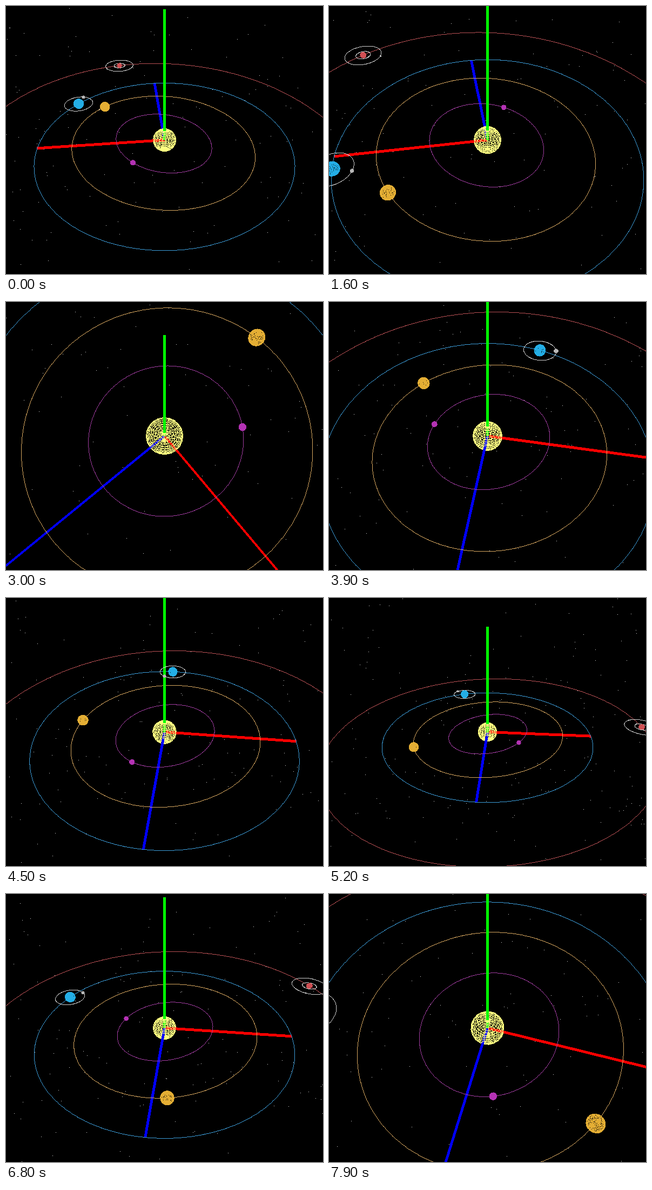
These frames come from a looping animation (587 by 495 pixels, 8000 ms). An HTML page with a canvas:

```html
<!DOCTYPE html>
<html>
<head>
<meta charset="utf-8">
<style>
html, body { margin: 0; width: 100%; height: 100%; overflow: hidden; background: #000; }
canvas { display: block; }
</style>
</head>
<body>
<canvas id="stage" width="587" height="495"></canvas>
<script>
const W = 587, H = 495, FOCAL = 567, LOOP = 8000, STEP = 100, RAD = Math.PI / 180;
const SUN_R = 0.092;
const ctx = document.getElementById('stage').getContext('2d');

// Distances in units of the blue planet's orbit, angles in degrees, rates in degrees per second.
const planets = [
  { r: 0.387, tilt: 7, start: -47.4, rate: 121.8, size: 0.0174, color: '#b432b4', ring: '#a03ca0', moons: [] },
  { r: 0.723, tilt: 3.39, start: 46.4, rate: 47.6, size: 0.0428, color: '#e4ae34', ring: '#d8a860', moons: [] },
  { r: 1, tilt: 0, start: 40.9, rate: 29.2, size: 0.0455, color: '#24aee6', ring: '#3c9cd8',
    moons: [{ r: 0.132, start: 105, rate: 392.4, size: 0.0123 }] },
  { r: 1.52, tilt: 1.85, start: 75.7, rate: 15.5, size: 0.025, color: '#d05054', ring: '#b85054',
    moons: [{ r: 0.0635, start: -32, rate: 1190, size: 0.004 },
            { r: 0.159, start: -29.6, rate: 984, size: 0.005 }] }
];

// Slightly uneven simulation clock, and the camera's run back and forth along z.
const clock = [[0, 0], [1.6, 1.602], [3, 3.026], [3.9, 3.95], [5.2, 5.214], [6.8, 6.804], [8, 8]];
const dolly = [[0, -1.959], [0.56, -2.583], [5.705, 3.17], [8, 0.648]];

function along(keys, t) {
  let i = 1;
  while (i < keys.length - 1 && t > keys[i][0]) i++;
  const [t0, a] = keys[i - 1], [t1, b] = keys[i];
  return a + (b - a) * (t - t0) / (t1 - t0);
}

let seed = 7;
function random() {
  seed = (seed * 16807) % 2147483647;
  return seed / 2147483647;
}
const stars = Array.from({ length: 600 }, () => [0, 0, 0].map(() => random() * 6 - 3));

let cam, dist, sinE, cosE, sinA, cosA;
function aim(z) {
  cam = [0.21, 1.503, z];
  dist = Math.hypot(...cam);
  const flat = Math.hypot(cam[0], z);
  sinE = cam[1] / dist;
  cosE = flat / dist;
  sinA = cam[0] / flat;
  cosA = z / flat;
}

function project([x, y, z]) {
  const u = x * cosA - z * sinA, w = x * sinA + z * cosA;
  const depth = dist - cosE * w - sinE * y;
  if (depth < 0.05) return null;
  return [W / 2 + FOCAL * u / depth, H / 2 - FOCAL * (cosE * y - sinE * w) / depth];
}

// Hard-edged line, widened across its minor direction.
function line(p, q, width = 1) {
  const a = project(p), b = project(q);
  if (!a || !b) return;
  const dx = b[0] - a[0], dy = b[1] - a[1];
  const n = Math.max(1, Math.ceil(Math.max(Math.abs(dx), Math.abs(dy))));
  const steep = Math.abs(dy) > Math.abs(dx), half = width >> 1;
  for (let i = 0; i <= n; i++) {
    const x = Math.floor(a[0] + dx * i / n), y = Math.floor(a[1] + dy * i / n);
    if (x < -width || y < -width || x > W + width || y > H + width) continue;
    if (steep) ctx.fillRect(x - half, y, width, 1);
    else ctx.fillRect(x, y - half, 1, width);
  }
}

function onOrbit(center, r, tilt, deg) {
  const x = r * Math.cos(deg * RAD), z = r * Math.sin(deg * RAD);
  return [center[0] + x * Math.cos(tilt * RAD), center[1] + x * Math.sin(tilt * RAD), center[2] + z];
}

function ring(center, r, tilt, color) {
  ctx.fillStyle = color;
  for (let a = 0; a < 360; a += 3) {
    line(onOrbit(center, r, tilt, a), onOrbit(center, r, tilt, a + 3));
  }
}

// side: 1 draws the half facing the camera, -1 the far half, 0 both.
function sphere(center, r, color, spin, side = 0) {
  const point = (i, j) => {
    const lat = i * 9 * RAD, lon = (j * 18 + spin) * RAD, s = r * Math.sin(lat);
    return [center[0] + s * Math.cos(lon), center[1] + r * Math.cos(lat), center[2] + s * Math.sin(lon)];
  };
  ctx.fillStyle = color;
  for (let i = 0; i < 20; i++) {
    for (let j = 0; j < 20; j++) {
      const p = point(i, j);
      const facing = p.reduce((sum, v, k) => sum + (v - center[k]) * (cam[k] - v), 0);
      if (side * facing < 0) continue;
      line(p, point(i + 1, j));
      line(p, point(i, j + 1));
    }
  }
}

function disc(center, r, color) {
  const p = project(center);
  if (!p) return;
  const edge = project([center[0], center[1] + r, center[2]]);
  const size = Math.max(1, (p[1] - edge[1]) / cosE);
  ctx.fillStyle = color;
  for (let y = -Math.ceil(size); y <= size; y++) {
    const half = Math.round(Math.sqrt(Math.max(0, size * size - y * y)));
    ctx.fillRect(Math.floor(p[0]) - half, Math.floor(p[1]) + y, half * 2 + 1, 1);
  }
}

function axis(k, color, from) {
  const end = v => [0, 1, 2].map(i => i === k ? v : 0);
  ctx.fillStyle = color;
  line(end(from), end(1), 5);
}

function draw(ms) {
  const t = along(clock, ms / 1000);
  const origin = [0, 0, 0], sunColor = '#ffff80', spin = -422 * t;
  aim(along(dolly, t));

  ctx.fillStyle = '#000';
  ctx.fillRect(0, 0, W, H);
  ctx.fillStyle = '#e4e4e4';
  for (const star of stars) {
    const p = project(star);
    if (p) ctx.fillRect(Math.floor(p[0]), Math.floor(p[1]), 1, 1);
  }

  sphere(origin, SUN_R, sunColor, spin, -1);
  axis(0, '#f00', 0);
  axis(2, '#00f', 0);
  axis(1, '#0f0', 0);
  sphere(origin, SUN_R, sunColor, spin, 1);
  if (sinA > 0) axis(0, '#f00', SUN_R);
  if (cosA > 0) axis(2, '#00f', SUN_R);
  for (const p of planets) ring(origin, p.r, p.tilt, p.ring);
  axis(1, '#0f0', SUN_R);

  for (const p of planets) {
    const at = onOrbit(origin, p.r, p.tilt, p.start - p.rate * t);
    for (const m of p.moons) ring(at, m.r, 0, '#d0d0d0');
    sphere(at, p.size, p.color, -40 * t);
    for (const m of p.moons) {
      disc(onOrbit(at, m.r, 0, m.start - m.rate * t), m.size, '#b8b8b8');
    }
  }
}

const begin = performance.now();
let shown = -1;
function tick() {
  const ms = Math.floor(((performance.now() - begin) % LOOP) / STEP) * STEP;
  if (ms !== shown) draw(shown = ms);
  requestAnimationFrame(tick);
}
tick();
</script>
</body>
</html>
```
